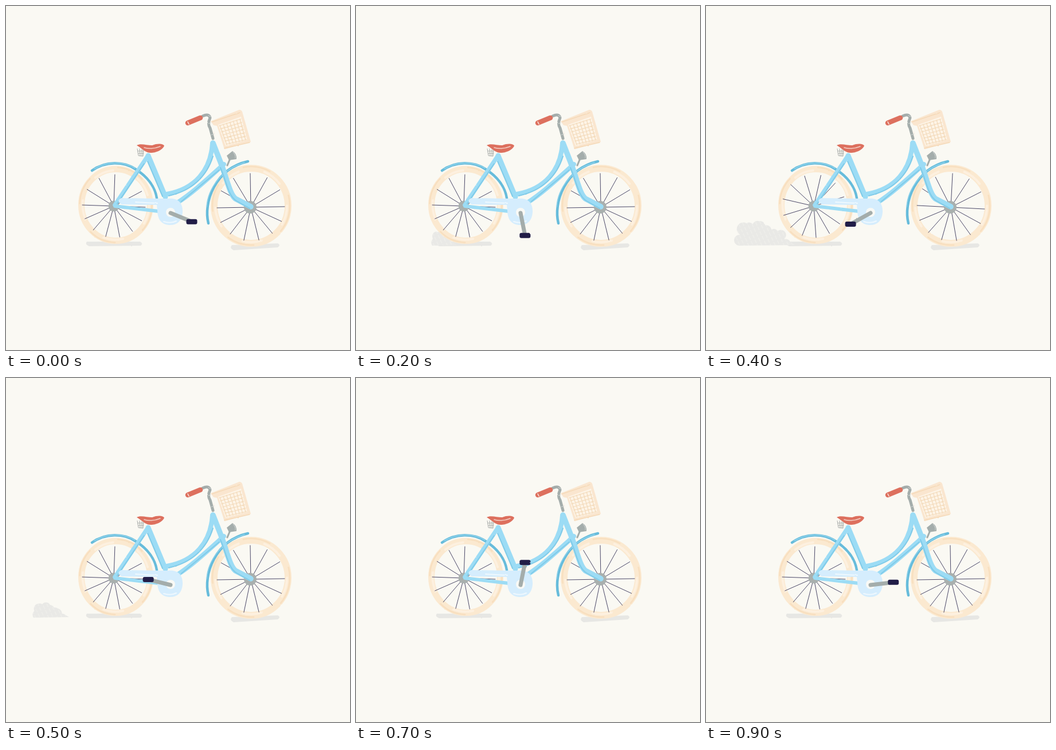
An HTML page that plays this animation: 600 px wide and 600 px high, repeating every 1000 ms.

```html
<!DOCTYPE html>
<html lang="en">
<head>
<meta charset="utf-8">
<title>Bicycle</title>
<style>
  html, body { margin: 0; height: 100%; overflow: hidden; background: #faf9f3; }
  svg { display: block; width: 100%; height: 100%; fill: none; stroke-linecap: round; stroke-linejoin: round; }
  .blue { stroke: #9cdcf5; }
  .shade { stroke: #80cbe8; stroke-width: 2; }
  .gray { stroke: #a4adab; }
</style>
</head>
<body>
<svg viewBox="0 0 600 600">
  <defs>
    <filter id="rough" x="0" y="0" width="600" height="600" filterUnits="userSpaceOnUse" color-interpolation-filters="sRGB">
      <feTurbulence type="fractalNoise" baseFrequency=".12" numOctaves="2" seed="4"/>
      <feDisplacementMap in="SourceGraphic" scale="1.6" xChannelSelector="R" yChannelSelector="G"/>
    </filter>
    <pattern id="chalk" width="7" height="9" patternUnits="userSpaceOnUse" patternTransform="rotate(-25)">
      <rect width="7" height="9" fill="#e9e9e6"/>
      <path d="M3 0V6" stroke="#efefeb" stroke-width="1.5"/>
    </pattern>
  </defs>

  <g filter="url(#rough)">
    <path fill="#e7e7e4" d="M141 411L234 411Q240 414 235 418L145 419Q137 416 141 411ZM394 417L474 414Q480 417 474 421L397 426Q389 422 394 417Z"/>
    <path id="dust" fill="url(#chalk)"/>
    <g id="tyres"></g>
  </g>

  <path id="spokes" stroke="#4b4868"/>

  <g filter="url(#rough)">
    <circle cx="188" cy="349" r="9.5" fill="#a9b0ae"/>
    <circle cx="426" cy="351" r="11" fill="#a9b0ae"/>

    <!-- mudguards -->
    <g stroke="#67bcdb" stroke-width="4.5">
      <path d="M150 287C174 270 205 271 225 284C246 297 260 315 263 335"/>
      <path d="M353 379C344 343 364 284 422 271"/>
    </g>
    <g stroke="#8fd3ec" stroke-width="1.5">
      <path d="M154 284C178 270 205 271 225 283"/>
      <path d="M350 350C352 318 377 284 416 273"/>
    </g>

    <!-- frame -->
    <path class="blue" stroke-width="6" d="M190 349L266 358"/>
    <path class="blue" stroke-width="7.5" d="M247 262L190 347"/>
    <path class="shade" d="M241 275L194 345"/>
    <path class="blue" stroke-width="9" d="M248 261L278 333"/>
    <path class="shade" d="M247 271L273 332"/>
    <path class="blue" stroke-width="8" d="M360 240C357 286 330 319 281 328M380 276C352 301 328 324 299 343"/>
    <path class="shade" d="M361 262C351 296 325 322 284 331M372 286L306 341"/>
    <path class="blue" stroke-width="9.5" d="M361 239L374 272C385 300 390 328 400 336L427 350"/>
    <path class="shade" d="M374 282C385 308 388 332 402 340L425 353"/>

    <!-- chain guard -->
    <path fill="#d5edfd" d="M201 335L283 336C301 334 309 345 308 360C307 376 297 383 284 382C271 381 264 372 264 356L263 347L202 346Q191 340 201 335Z"/>
    <path stroke="#eef8fe" stroke-width="2" d="M226 342L264 344M275 376Q287 380 297 375"/>
    <circle cx="287" cy="360" r="8" fill="#f9f9f5"/>

    <!-- saddle -->
    <path stroke="#a9adaa" d="M229 249L231 261L239 262L240 250M233 249L234 261M237 250V261M230 253H240M231 257H240"/>
    <path fill="#dd705e" d="M228 243C234 239 246 243 255 243C264 239 275 240 276 244C272 252 262 256 252 256C243 256 238 249 228 243Z"/>
    <path stroke="#f4d3c8" stroke-width="1.5" d="M241 247Q254 251 269 245"/>

    <!-- handlebar -->
    <path stroke="#fbf6ee" stroke-width="5" d="M362 221V226"/>
    <path class="gray" stroke-width="5" d="M343 192Q354 187 356 195Q351 206 356 213L361 231"/>
    <path stroke="#d5d9d6" d="M353 191L357 193M353 205L357 204M358 225L363 223"/>
    <path stroke="#dd705e" stroke-width="8.5" d="M317 204L339 195"/>
    <path stroke="#f8e4dc" stroke-width="1.6" d="M317 202L319 206"/>

    <!-- basket -->
    <path fill="#fae6cf" d="M357 201L407 181Q412 181 413 188L427 237L381 250L368 209L362 208Z"/>
    <path fill="#fdf4e7" d="M370 207L410 193L421 234L383 244Z"/>
    <path id="weave" stroke="#f3d9b8" stroke-width="1.2"/>
    <path stroke="#f5d9b7" stroke-width="1.5" d="M360 202L408 186M381 248L425 238"/>

    <!-- lamp -->
    <path class="gray" stroke-width="3" d="M391 266L386 278"/>
    <path fill="#a4adab" d="M385 261L395 253Q403 258 402 267L389 269Z"/>
    <path stroke="#d4d8d5" d="M396 255Q401 260 400 265"/>

    <path id="crank" class="gray" stroke-width="7"/>
    <rect id="pedal" width="19" height="9" rx="3" fill="#211d47"/>
  </g>
</svg>

<script>
const { sin, cos, PI } = Math;
const rad = deg => deg * PI / 180;
const $ = id => document.getElementById(id);
const setPath = (id, d) => $(id).setAttribute('d', d);
const line = (x1, y1, x2, y2) => `M${x1} ${y1}L${x2} ${y2}`;

function tyre(cx, cy, rx, ry, w) {
  const ring = (grow, color, width, dash = '') =>
    `<ellipse cx="${cx}" cy="${cy}" rx="${rx + grow}" ry="${ry + grow}" stroke="${color}" stroke-width="${width}" stroke-dasharray="${dash}"/>`;
  return ring(0, '#fbe9d0', w) + ring(-2, '#fdf0df', 4, '34 46') + ring(3, '#f8dfbf', 2.5, '48 54');
}

// Slanted grid inside the basket
function weave() {
  let d = '';
  for (let k = 0; k <= 1.01; k += 1 / 6) {
    d += line(373 + 35 * k, 208 - 11 * k, 385 + 33 * k, 242 - 8 * k);
    d += line(372 + 12 * k, 209 + 32 * k, 410 + 10 * k, 197 + 36 * k);
  }
  return d;
}

// Six gaps in the upper half of the wheel, seven in the lower
function spokes(cx, cy, r, turn) {
  let d = '';
  for (let i = -6; i < 7; i++) {
    const a = rad(turn + i * 180 / (i < 0 ? 6 : 7));
    d += line(cx, cy, cx + r * cos(a), cy + r * sin(a));
  }
  return d;
}

// Bumpy cloud that drifts back, swells and shrinks; k runs from 0 to 1
function cloud(k) {
  const left = 133 - 85 * (1 - (1 - k) ** 2);
  const right = 175 - 65 * k ** 3;
  const height = 26 + 18 * sin(PI * k);
  const lobes = 9;
  let d = `M${left} 418`;
  for (let i = 0; i < lobes; i++) {
    const u = (i + .2) / lobes;
    const bump = 2.6 * u ** .45 * (1 - u) ** 1.2 + .08 * sin(i * 2.4);
    d += `A9 9 0 0 1 ${left + (right - left) * u} ${418 - height * bump}`;
  }
  return d + `L${right} 417Z`;
}

function draw(step) {
  // The wheels flicker between two poses
  const flick = step > 2 && step % 2 === 0;
  setPath('spokes', spokes(188, 349, 55, flick ? -17 : 2) + spokes(427, 351, 59, flick ? 3 : -1));

  // One uneven turn of the crank per loop
  const a = rad(18 + 36 * step + 14 * cos(rad(36 * (step - 8))));
  const x = 287 + 40 * cos(a), y = 361 + 40 * sin(a);
  setPath('crank', line(287, 361, 287 + 35 * cos(a), 361 + 35 * sin(a)));
  $('pedal').setAttribute('x', x - 9.5);
  $('pedal').setAttribute('y', y - 4.5);

  setPath('dust', step >= 2 && step <= 5 ? cloud((step - 2) / 3) : '');
}

$('tyres').innerHTML = tyre(191.5, 347, 60, 62.5, 11) + tyre(427.5, 348.5, 64.5, 65.5, 12);
setPath('weave', weave());

function tick() {
  draw(Math.floor(performance.now() % 1000 / 100));
  requestAnimationFrame(tick);
}
tick();
</script>
</body>
</html>
```
